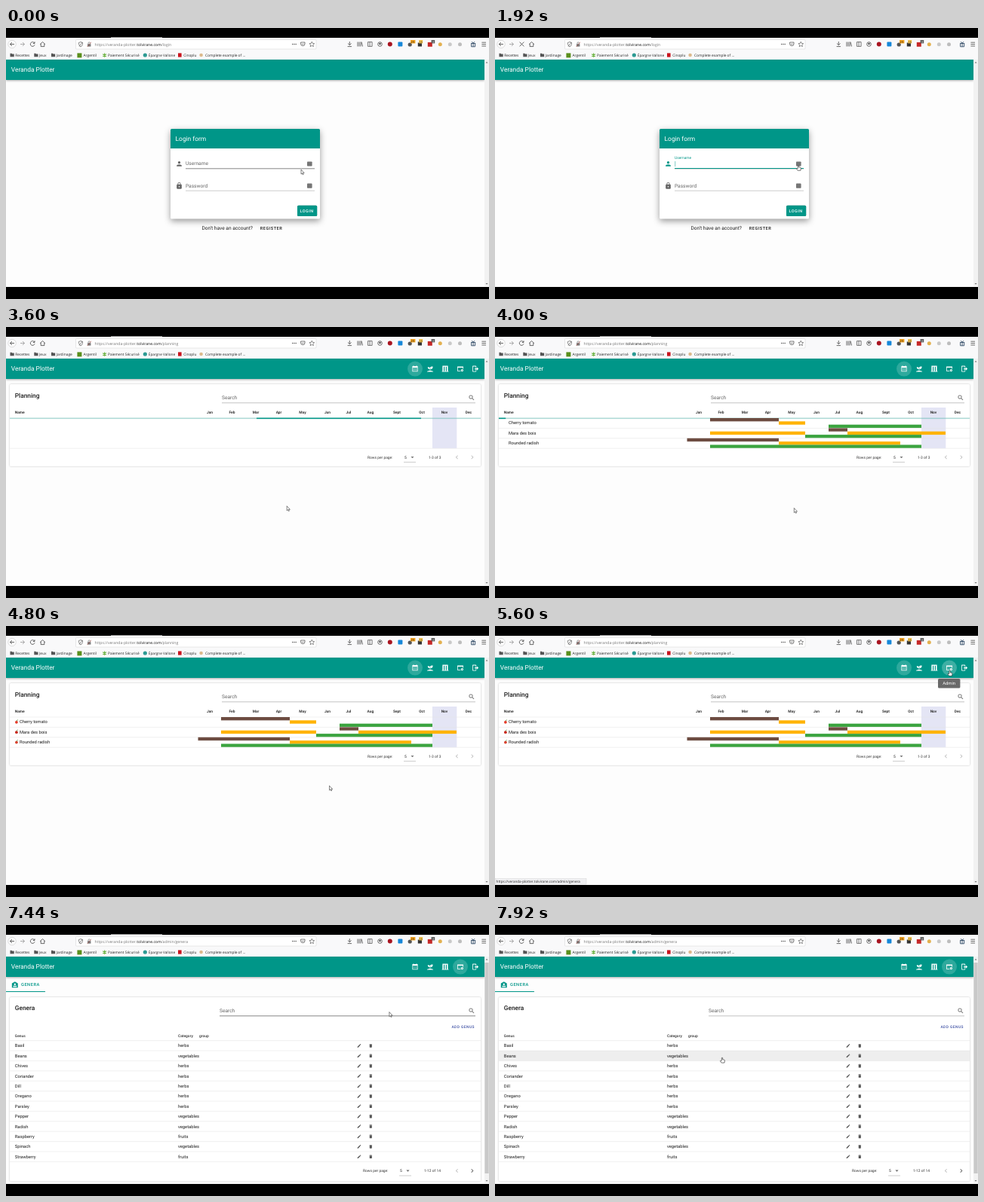
Write an HTML page that moves like this. It is 640 by 360 pixels and loops after 8000 ms.

```html
<!DOCTYPE html>
<html lang="en">
<head>
<meta charset="utf-8">
<title>Planner walkthrough</title>
<style>
html, body { margin: 0; width: 100%; height: 100%; overflow: hidden; background: #000; }
svg { display: block; width: 100%; height: 100%; }
text { font-family: Roboto, Arial, sans-serif; text-rendering: geometricPrecision; white-space: pre; }
.ui { font-family: "Open Sans", "Noto Sans", sans-serif; }
.card { fill: #fff; filter: drop-shadow(0 .7px 1px rgba(0,0,0,.24)); }
.raised { fill: #fff; filter: drop-shadow(0 3px 4px rgba(0,0,0,.4)); }
</style>
</head>
<body>
<svg id="stage" viewBox="0 0 640 360" xmlns="http://www.w3.org/2000/svg"></svg>
<script>
const TEAL = '#009688', INK = '#1c1c1c', GREY = '#666', RED = '#d83a2e';
const ICON = {
  user: 'M12 4a4 4 0 1 1 0 8 4 4 0 0 1 0-8m0 10c4.42 0 8 1.79 8 4v2H4v-2c0-2.21 3.58-4 8-4z',
  lock: 'M12 17a2 2 0 1 0 0-4 2 2 0 0 0 0 4m6-9a2 2 0 0 1 2 2v10a2 2 0 0 1-2 2H6a2 2 0 0 1-2-2V10c0-1.1.9-2 2-2h1V6a5 5 0 0 1 10 0v2h1m-6-5a3 3 0 0 0-3 3v2h6V6a3 3 0 0 0-3-3z',
  calendar: 'M3 3h3V1h2v2h8V1h2v2h3v18H3zM5 8v11h14V8zM7 10h2v2H7zM11 10h2v2h-2zM15 10h2v2h-2zM7 14h2v2H7zM11 14h2v2h-2zM15 14h2v2h-2z',
  sprout: 'M2 22v-2s5-2 10-2 10 2 10 2v2zM11.3 9.1C10.1 5.2 4 6.1 4 6.1s.2 7.8 5.9 6.5C9.5 9.8 8 9 8 9c2.8 0 2.8 3.4 2.8 3.4V17H13V12.8S13 8.9 17 7.9c0 0-3 3-3 5 7 .7 7-8.9 7-8.9S12.1 3 11.3 9.1z',
  door: 'M3 2h18v18h2v2H1v-2h2zM7 5v15h3V5zM14 5v15h3V5z',
  admin: 'M2 4h20v8h-2V8H4v10h9v2H2zM18 13a4 4 0 1 1 0 8 4 4 0 0 1 0-8m0 2.5a1.5 1.5 0 1 0 0 3 1.5 1.5 0 0 0 0-3z',
  exit: 'M17 17.25V14h-7v-4h7V6.75L22.25 12 17 17.25M13 2a2 2 0 0 1 2 2v4h-2V4H4v16h9v-4h2v4a2 2 0 0 1-2 2H4a2 2 0 0 1-2-2V4a2 2 0 0 1 2-2h9z',
  search: 'M9.5 3A6.5 6.5 0 0 1 16 9.5c0 1.6-.6 3.1-1.56 4.23l.27.27h.79l5 5-1.5 1.5-5-5v-.79l-.27-.27A6.5 6.5 0 1 1 9.5 3m0 2a4.5 4.5 0 1 0 0 9 4.5 4.5 0 0 0 0-9z',
  pencil: 'M20.7 7c.4-.4.4-1 0-1.4l-2.3-2.3c-.4-.4-1-.4-1.4 0l-1.9 1.8 3.8 3.8M3 17.25V21h3.75L17.8 9.9l-3.75-3.75z',
  bin: 'M19 4h-3.5l-1-1h-5l-1 1H5v2h14M6 19a2 2 0 0 0 2 2h8a2 2 0 0 0 2-2V7H6z',
  barn: 'M12 2 22 8v14H2V8zM12 8a3 3 0 1 0 0 6 3 3 0 0 0 0-6M6 16v4h12v-4z',
  left: 'M15.4 16.6 10.8 12l4.6-4.6L14 6l-6 6 6 6z',
  right: 'M8.6 16.6 13.2 12 8.6 7.4 10 6l6 6-6 6z',
  down: 'M7 10l5 5 5-5z'
};

// Markup helpers; text and icons are placed by their vertical centre
const text = (s, x, cy, size, fill = INK, more = '') =>
  `<text x="${x}" y="${cy + size * .355}" font-size="${size}" fill="${fill}" ${more}>${s}</text>`;
const ui = (s, x, cy, size, fill = '#222', more = '') => text(s, x, cy, size, fill, 'class="ui" ' + more);
const caps = (s, x, cy, size, fill) => text(s, x, cy, size, fill, 'font-weight="500" letter-spacing=".089em"');
const rect = (x, y, w, h, fill, more = '') =>
  `<rect x="${x}" y="${y}" width="${w}" height="${h}" fill="${fill}" ${more}/>`;
const dot = (x, y, r, fill, more = '') => `<circle cx="${x}" cy="${y}" r="${r}" fill="${fill}" ${more}/>`;
const line = (d, color = '#444', w = .8, more = '') =>
  `<path d="${d}" fill="none" stroke="${color}" stroke-width="${w}" ${more}/>`;
const icon = (name, cx, cy, fill = GREY, size = 10, more = '') =>
  `<path d="${ICON[name]}" fill="${fill}" fill-rule="evenodd" transform="translate(${cx - size / 2} ${cy - size / 2}) scale(${size / 24})" ${more}/>`;
const group = (id, body, more = '') => `<g id="${id}" ${more}>${body}</g>`;
const hline = (x1, x2, y, color = '#e0e0e0', w = .5) => line(`M${x1} ${y}H${x2}`, color, w);

function browser() {
  let s = rect(0, 13, 640, 331, '#fdfdfd') + rect(0, 13, 640, 29, '#f9f9fa');
  s += dot(8, 21.5, 5.2, '#fff', 'stroke="#bbb" stroke-width=".5"') + line('M11 21.5H5.5M8 19 5.5 21.5 8 24');
  s += line('M19 21.5h5.5M22 19l2.5 2.5L22 24', '#999');
  s += group('reload', line('M37.7 20A2.9 2.9 0 1 0 38 22.3M38 18.3v2.2h-2.2'));
  s += group('halt', line('M32.6 18.6l5.8 5.8M38.4 18.6l-5.8 5.8'));
  s += line('M45 21.7l3.5-3.2 3.5 3.2M46.2 21v3.6h4.6V21');
  s += rect(92.5, 15.5, 318.5, 12.5, '#fff', 'rx="1" stroke="#d0d0d3" stroke-width=".5"');
  s += line('M99 18.5l2.6 1c0 3-1 4.6-2.6 5.5-1.6-.9-2.6-2.5-2.6-5.5zM97 24.5l4-5.5', '#555', .7);
  s += rect(108, 21.2, 4.4, 3.4, '#777') + line('M109 21v-1a1.2 1.2 0 0 1 2.4 0v1', '#777', .7);
  s += line('M107.6 25 113 18.8', '#b5544c', .6);
  s += `<text class="ui" x="117.6" y="23.7" font-size="5.1" fill="#777">https://veranda-plotter.<tspan fill="#111">tolvirane.com</tspan><tspan id="path"></tspan></text>`;
  for (const x of [379.8, 382, 384.2]) s += dot(x, 21.5, .7, '#444');
  s += line('M390.6 19h5.4v2a2.7 2.7 0 0 1-5.4 0zM392 20.8l1.3 1.2 1.3-1.2', '#444', .7);
  s += line('M405.3 18.2l1 2.2 2.4.3-1.8 1.6.5 2.4-2.1-1.2-2.1 1.2.5-2.4-1.8-1.6 2.4-.3z', '#444', .6);
  s += line('M455.3 18v4.5M453 20.5l2.3 2.2 2.3-2.2M452.6 24.6h5.4');
  s += line('M466 18.5v6M468 18.5v6M470 18.5v6M471 18.5l1.5 6');
  s += line('M479.5 18.6h5.6v5.8h-5.6zM482 18.6v5.8', '#444', .7);
  s += dot(495.5, 21.5, 2.8, 'none', 'stroke="#444" stroke-width=".8"') + dot(495.5, 21, 1.2, '#444');
  s += dot(508.8, 21.5, 3, '#a81420') + rect(519.4, 18.6, 6, 6, '#1687d9', 'rx="1"');
  s += dot(535.2, 22, 2.6, '#555') + rect(536, 16, 6.4, 4.4, '#f6a21a') + ui('25', 536.6, 18.2, 4, '#222');
  s += rect(545.8, 19.5, 5.2, 5, '#333') + rect(547.2, 16, 5, 4.4, '#f8c64a') + ui('13', 547.3, 18.2, 3.8);
  s += rect(558.8, 19, 6, 5.8, '#c62828') + rect(563.6, 16, 4.6, 4.4, '#555') + ui('3', 564.8, 18.2, 4, '#fff');
  s += dot(575.3, 21.7, 2.5, '#e3b04e') + dot(588.3, 21.7, 2.5, '#c9c9c9') + dot(601.5, 21.7, 2.5, '#bdbdbd');
  s += line('M616 20.5h6.2M616.6 20.8v4h5v-4M619.1 20v4.8M619 20l-1.8-1.8M619.2 20l1.8-1.8', '#2f4a66', .9);
  s += line('M630.4 19.2h5.6M630.4 21.6h5.6M630.4 24h5.6');
  for (const [x, label] of [[5.5, 'Recettes'], [37.3, 'Jeux'], [60, 'Jardinage']])
    s += `<path d="M${x} 33.8h2l.6.8h2.6v3.6h-5.2z" fill="#555"/>` + ui(label, x + 6.7, 36.2, 4.85);
  s += rect(94.4, 33.4, 6, 6, '#5a8f1c') + ui('Argentil', 102.5, 36.2, 4.85);
  s += line('M130.6 33.4v5.4M128.2 34.8l4.8 2.6M133 34.8l-4.8 2.6', '#62ad35', 1.1) + ui('Paiement Sécurisé', 135, 36.2, 4.85);
  s += dot(184.3, 36, 2.6, '#2c9a93') + ui('Épargne Vallone', 188.8, 36.2, 4.7);
  s += rect(228, 33.4, 4.6, 5.2, '#c9141d') + ui('Cinoplu', 235.2, 36.2, 4.85);
  s += dot(258.6, 36, 2.3, '#dcb98c') + ui('Complete example of ...', 264, 36.2, 4.85);
  return s;
}

function loginPage() {
  const manager = y => rect(399, y - 3, 6.6, 6.2, '#757575', 'rx=".8"');
  let s = rect(218, 134, 198, 119.5, '#fff', 'rx="1.5" class="raised"');
  s += `<path d="M218 160v-24.5q0-1.5 1.5-1.5h195q1.5 0 1.5 1.5V160z" fill="${TEAL}"/>`;
  s += text('Login form', 224.6, 147, 8.4, '#fff');
  s += icon('user', 229.5, 180.3, GREY, 10, 'id="userIcon"') + icon('lock', 229.5, 209.5, GREY, 10);
  s += hline(238, 409, 216.2, '#999') + '<path id="rule" d="M238 186.8H409" stroke-width=".6"/>';
  s += `<rect id="focus" y="186" height="1"/>`;
  s += '<text id="label" x="238">Username</text>';
  s += group('error', text('Username is required', 238, 192, 4.8, RED));
  s += rect(238.6, 177, .5, 7.2, TEAL, 'id="caret"');
  s += text('Password', 238, 209.6, 6.6, GREY) + manager(180.4) + manager(209.6);
  s += rect(386, 235.8, 26.2, 14.2, TEAL, 'rx="1.6" style="filter:drop-shadow(0 .6px .7px rgba(0,0,0,.45))"');
  s += caps('LOGIN', 389.6, 243, 5.4, '#fff');
  s += text('Don\'t have an account?', 259.5, 265.6, 6.6) + caps('REGISTER', 336.8, 266, 5.6);
  return s;
}

const footer = (x, y, range, next) =>
  text('Rows per page:', x, y, 4.9, '#333') + text('5', x + 49, y, 4.9) + icon('down', x + 59.5, y, GREY, 10) +
  hline(x + 48, x + 64, y + 6.6, '#999') + text(range, x + 81, y, 4.9, '#333') +
  icon('left', 597.5, y, '#bbb') + icon('right', 617.8, y, next);

const searchBox = (id, x, y) =>
  text('Search', x, y, 6.6, GREY) + icon('search', 617, y, GREY, 9.5) +
  `<path id="${id}" d="M${x} ${y + 6.8}H622" stroke-width=".6"/>`;

const PLAN = { top: 121, step: 13.4, count: 3 }, GENERA = { top: 153.6, step: 13.4, count: 12 };

function planningPage() {
  const months = [['Jan', 270], ['Feb', 299.5], ['Mar', 331], ['Apr', 361.5], ['May', 393], ['Jun', 426],
    ['Jul', 454], ['Aug', 483], ['Sept', 518], ['Oct', 551], ['Nov', 581], ['Dec', 613]];
  const tones = ['#6d4c41', '#ffb300', '#3ba43f'];
  // plant, then [tone, from, to]
  const plants = [
    ['Cherry tomato', '#e53a28', [0, 285, 376], [1, 376, 411], [2, 442, 565]],
    ['Mara des bois', '#c8281e', [0, 442, 467], [1, 285, 411], [1, 467, 597], [2, 411, 565]],
    ['Rounded radish', '#d8422f', [0, 254.5, 376], [1, 376, 537], [2, 285, 565]]
  ];
  let s = rect(5, 76, 624, 109, '#fff', 'rx="1.5" class="card"');
  s += text('Planning', 11.8, 90.7, 8.3, INK, 'font-weight="500"') + searchBox('planRule', 286, 94);
  s += rect(5, 0, 624, PLAN.step, '#eee', 'id="planHover"');
  s += rect(565, 107, 32.3, 54.2, '#e4e5f5');
  s += text('Name', 11.8, 113.6, 4.9, '#333', 'font-weight="700"');
  for (const [m, x] of months) s += text(m, x, 113.6, 4.9, '#333', 'font-weight="700" text-anchor="middle"');
  s += hline(5, 629, 121);
  s += group('loader', rect(5, 120.6, 624, 1.5, TEAL, 'opacity=".3"') + `<rect id="bar" y="120.6" height="1.5" fill="${TEAL}"/>`);
  let rows = '', marks = '';
  plants.forEach(([name, tone, ...bars], i) => {
    const y = PLAN.top + i * PLAN.step;
    rows += text(name, 18, y + 6.4, 5.8);
    if (i) rows += hline(5, 629, y);
    for (const [k, a, b] of bars) rows += rect(a, y + k * 4.35, b - a, 4.35, tones[k]);
    marks += dot(13.9, y + 6.8, 1.9, tone) + line(`M13.9 ${y + 5}l1.6-1.4`, '#4d8b31', .9);
  });
  return s + group('plants', rows) + group('marks', marks) + hline(5, 629, 161.2) + footer(479, 173, '1-3 of 3', '#bbb');
}

function generaPage() {
  const kinds = { h: 'herbs', v: 'vegetables', f: 'fruits' };
  const list = 'Basil h,Beans v,Chives h,Coriander h,Dill h,Oregano h,Parsley h,Pepper v,Radish v,Raspberry f,Spinach v,Strawberry f';
  let s = icon('barn', 11.8, 79.2, TEAL, 9.5) + caps('GENERA', 20, 79.3, 5.7, TEAL) + rect(0, 88, 52, 1, TEAL);
  s += rect(5, 96, 624, 244.5, '#fff', 'rx="1.5" class="card"');
  s += text('Genera', 11.8, 110.2, 8.3, INK, 'font-weight="500"') + searchBox('genRule', 283, 114);
  s += caps('ADD GENUS', 590.4, 134.9, 4.9, '#3f51a5');
  s += rect(5, 0, 624, GENERA.step, '#eee', 'id="genHover"');
  for (const [h, x] of [['Genus', 11.8], ['Category', 228], ['group', 256]])
    s += text(h, x, 147, 4.9, '#333', 'font-weight="500"');
  list.split(',').forEach((item, i) => {
    const [name, kind] = item.split(' '), y = GENERA.top + i * GENERA.step, mid = y + 6.7;
    s += hline(5, 629, y) + text(name, 11.8, mid, 5.8) + text(kinds[kind], 228, mid, 5.8);
    s += icon('pencil', 468, mid, '#555', 6.2) + icon('bin', 483.3, mid, '#555', 6.2);
  });
  return s + hline(5, 629, 314.4) + footer(473, 326.4, '1-12 of 14', '#555');
}

function appBar() {
  const names = ['calendar', 'sprout', 'door', 'admin', 'exit'];
  let nav = dot(542, 55.6, 10, '#fff', 'id="onPlan"') + dot(602, 55.6, 10, '#fff', 'id="onAdmin"');
  names.forEach((n, i) => nav += icon(n, 542 + i * 20, 55.6, '#fff', 9.6));
  return rect(0, 42, 634, 27, TEAL, 'style="filter:drop-shadow(0 1px 1.4px rgba(0,0,0,.32))"') +
    text('Veranda Plotter', 6.8, 55.5, 8.4, '#fff') + group('nav', nav);
}

const overlay = () =>
  rect(634, 42, 6, 301, '#f2f2f2') + rect(634.4, 50, 5.2, 280, '#c9c9c9', 'id="thumb"') +
  '<path d="M635.5 46.5l1.5-1.8 1.5 1.8zM635.5 339l1.5 1.8 1.5-1.8z" fill="#777"/>' +
  group('tip', rect(587, 70, 29.4, 12.6, '#616161', 'rx="1.5" opacity=".95"') + text('Admin', 601.7, 76.3, 5.8, '#fff', 'text-anchor="middle"')) +
  group('status', rect(0, 335.6, 121, 7.4, '#f0f0f2', 'stroke="#ccc" stroke-width=".4"') +
    ui('https://veranda-plotter.tolvirane.com/admin/genera', 1.6, 339.4, 4.6)) +
  rect(0, 0, 640, 12.4, '#000') + rect(139, 12.2, 68, .9, '#bdbdbd') + rect(0, 344, 640, 16, '#000') +
  group('cursor',
    '<path id="arrow" d="M0 0v6.1l1.4-1.2.9 2 .9-.4-.9-1.9h1.9z"/>' +
    '<path id="hand" transform="scale(1.1)" d="M-.6 4V.6Q0-.3.6.6V2.6l2 .5q.6.2.5.8L2.7 6.6H-.8L-2.3 4.6q0-1 .9-.5z"/>',
    'fill="#fff" stroke="#222" stroke-width=".55" stroke-linejoin="round"');

document.getElementById('stage').innerHTML = browser() + group('login', loginPage()) +
  group('planning', planningPage()) + group('genera', generaPage()) + appBar() + overlay();

const el = {};
document.querySelectorAll('[id]').forEach(n => el[n.id] = n);
const set = (id, attrs) => { for (const k in attrs) el[id].setAttribute(k, attrs[k]); };
const show = (id, on) => { el[id].style.display = on ? '' : 'none'; };

const PLAN_AT = 3440, GENERA_AT = 5680, FOCUS_AT = 1040, BLUR_AT = 2700;
const clamp = v => Math.max(0, Math.min(1, v));
const ramp = (t, from, span) => clamp((t - from) / span);
const easeOut = p => 1 - (1 - p) ** 3;
const smooth = p => p * p * (3 - 2 * p);
const mix = (a, b, p) => a + (b - a) * p;

// Pointer: time, x, y
const TRACK = [[0, 391, 188], [80, 391, 188], [880, 401, 182], [1200, 402, 182], [2400, 402, 182],
  [2800, 356.5, 236], [3360, 356.5, 236], [3920, 396.3, 240.5], [4640, 396.3, 240.5], [5280, 602.5, 59],
  [6880, 602.5, 59], [7280, 520, 112], [7360, 520, 112], [7920, 301, 175.8], [8000, 301, 175.8]];

function pointer(t) {
  const i = TRACK.findIndex(k => k[0] > t), a = TRACK[i - 1], b = TRACK[i];
  const p = smooth((t - a[0]) / (b[0] - a[0]));
  return [mix(a[1], b[1], p), mix(a[2], b[2], p)];
}

function hoverRow(id, table, y, on) {
  const i = Math.floor((y - table.top) / table.step), hit = on && i >= 0 && i < table.count;
  show(id, hit);
  if (hit) set(id, { y: table.top + i * table.step });
  return hit;
}

function drawLogin(t, x, y) {
  const on = easeOut(ramp(t, FOCUS_AT, 300)), off = easeOut(ramp(t, BLUR_AT, 300));
  const lift = on * (1 - off), focused = t >= FOCUS_AT && t < BLUR_AT, bad = t >= BLUR_AT;
  const color = bad ? RED : focused ? TEAL : GREY, size = mix(6.6, 4.9, lift);
  const hover = y > 174 && y < 190 && x > 238 && x < 409;
  set('label', { y: mix(180, 172.2, lift) + size * .355, 'font-size': size, fill: color });
  set('userIcon', { fill: color });
  set('rule', { stroke: bad ? RED : hover ? '#333' : '#999' });
  set('focus', { x: 323.5 - 85.5 * lift, width: 171 * lift, fill: color });
  show('caret', focused);
  show('error', bad);
  set('error', { opacity: ramp(t, BLUR_AT, 240) });
}

function draw(t) {
  const [x, y] = pointer(t);
  const page = t < PLAN_AT ? 'login' : t < GENERA_AT ? 'planning' : 'genera';
  for (const p of ['login', 'planning', 'genera']) show(p, p === page);
  show('nav', page !== 'login');
  show('thumb', page === 'genera');
  el.path.textContent = page === 'genera' ? '/admin/genera' : '/' + page;
  const loading = t >= 1920 && t < 2080;
  show('halt', loading);
  show('reload', !loading);
  drawLogin(t, x, y);

  show('plants', t >= 3760);
  show('marks', t >= 4240);
  show('loader', t < 4240);
  set('loader', { opacity: 1 - ramp(t, 4080, 160) });
  const run = (((t - 3988) / 1100) % 1 + 1) % 1, end = Math.min(629, 5 + 842 * run);
  const start = Math.max(5, 5 + 842 * run - 218);
  set('bar', { x: start, width: Math.max(0, end - start) });

  const overAdmin = Math.hypot(x - 602, y - 55.6) < 10;
  const onRow = hoverRow('planHover', PLAN, y, page === 'planning') | hoverRow('genHover', GENERA, y, page === 'genera');
  set('planRule', { stroke: page === 'planning' && x > 286 && x < 622 && y > 86 && y < 102 ? '#333' : '#999' });
  set('genRule', { stroke: page === 'genera' && x > 283 && x < 622 && y > 106 && y < 122 ? '#333' : '#999' });
  set('onPlan', { opacity: page === 'planning' ? .18 : 0 });
  const press = .08 + .16 * ramp(t, 5440, 160) * (1 - ramp(t, GENERA_AT, 320));
  set('onAdmin', { opacity: overAdmin ? press : page === 'genera' ? .18 : 0 });
  const tip = ramp(t, 5200, 160) * (1 - ramp(t, GENERA_AT, 160));
  show('tip', tip > 0);
  set('tip', { opacity: tip });
  show('status', overAdmin && page === 'planning');

  const onManager = page === 'login' && x > 398 && x < 407 && y > 176 && y < 185;
  const hand = onManager || overAdmin || (onRow && page === 'genera');
  show('hand', hand);
  show('arrow', !hand);
  set('cursor', { transform: `translate(${x} ${y})` });
}

function frame() {
  draw(Math.floor(performance.now() % 8000 / 80) * 80);
  requestAnimationFrame(frame);
}
frame();
</script>
</body>
</html>
```
